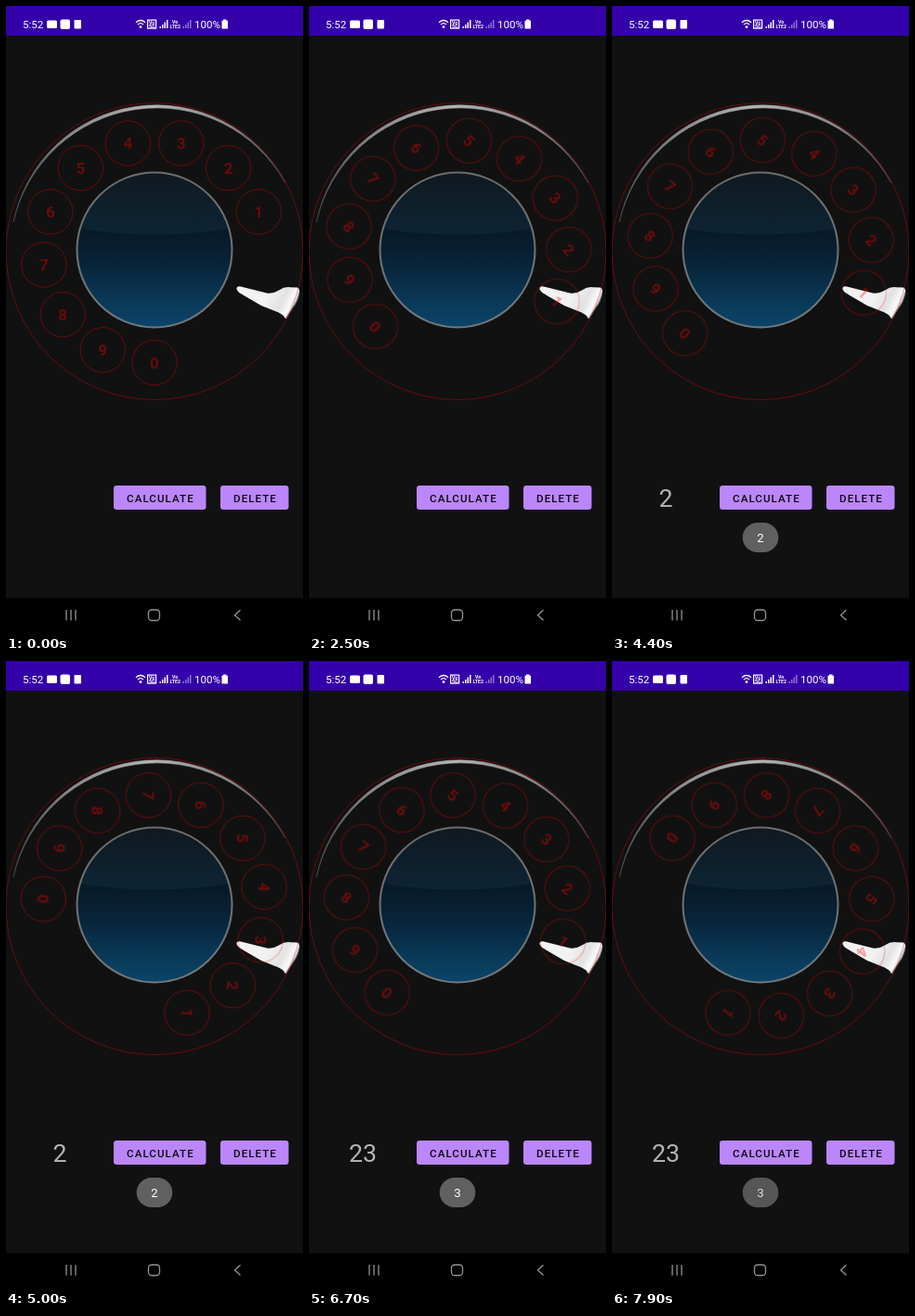
Animation, 320 px wide and 676 px high, one loop 8000 ms. Source, as an HTML page:

```html
<!DOCTYPE html>
<html lang="en">
<head>
<meta charset="utf-8">
<title>Rotary dial calculator</title>
<style>
  html, body { margin: 0; width: 100%; height: 100%; overflow: hidden; background: #111; }
  svg { display: block; width: 100%; height: 100%; font-family: Roboto, sans-serif; }

  .status { fill: #fff; font-size: 11.6px; }
  .status .tiny { font-size: 5.2px; font-weight: 700; }
  .button rect { fill: #bb86fc; }
  .button text { fill: #0a0a0a; font-size: 11.6px; font-weight: 500; letter-spacing: 1.04px; }
  .result { fill: #b4b4b4; font-size: 26.7px; }
  .toast rect { fill: #606060; }
  .toast text { fill: #fff; font-size: 13.2px; }
  .mid { text-anchor: middle; }
  .nav { fill: none; stroke: #949494; stroke-width: 1.3; }

  .ring, #dial circle { fill: none; stroke: rgba(255, 0, 0, .37); stroke-width: 1; }
  #dial text { fill: rgba(255, 0, 0, .36); font-size: 17px; font-weight: 700; }
  #dial { transform-origin: 160px 264.5px; }

  /* The screen refreshes every 100 ms, so all motion is stepped. */
  #dial, .result, .toast { animation: 8s -.01s steps(1) infinite; }
  #dial { animation-name: turn; }
  #first { animation-name: first; }
  #both { animation-name: both; }
  #toast2 { animation-name: toast2; }
  #toast3 { animation-name: toast3; }

  @keyframes turn {
    0% { transform: rotate(0deg); }
    23.75% { transform: rotate(0deg); animation-timing-function: steps(9); }
    35% { transform: rotate(71.3deg); }
    36.25% { transform: rotate(71.3deg); animation-timing-function: steps(6); }
    43.75% { transform: rotate(0deg); }
    48.75% { transform: rotate(0deg); animation-timing-function: steps(11); }
    62.5% { transform: rotate(93.8deg); }
    63.75% { transform: rotate(99deg); }
    65% { transform: rotate(99deg); animation-timing-function: steps(6); }
    72.5% { transform: rotate(0deg); }
    77.5% { transform: rotate(0deg); animation-timing-function: steps(5); }
    83.75% { transform: rotate(39.2deg); animation-timing-function: steps(12); }
    98.75%, 100% { transform: rotate(127.75deg); }
  }
  @keyframes first {
    0% { opacity: 0; }
    43.75% { opacity: 1; }
    72.5%, 100% { opacity: 0; }
  }
  @keyframes both {
    0% { opacity: 0; }
    72.5%, 100% { opacity: 1; }
  }
  @keyframes toast2 {
    0% { opacity: 0; }
    43.75% { opacity: .15; }
    45% { opacity: .55; }
    46.25% { opacity: .85; }
    47.5% { opacity: 1; }
    68.75% { opacity: .85; }
    70% { opacity: .45; }
    71.25%, 100% { opacity: 0; }
  }
  @keyframes toast3 {
    0% { opacity: 0; }
    72.5% { opacity: .15; }
    73.75% { opacity: .55; }
    75% { opacity: .85; }
    76.25% { opacity: 1; }
    98.75%, 100% { opacity: .88; }
  }
</style>
</head>
<body>
<svg viewBox="0 0 320 676" preserveAspectRatio="none">
  <defs>
    <linearGradient id="rim" gradientUnits="userSpaceOnUse" x1="8" y1="0" x2="302" y2="0">
      <stop offset="0" stop-color="#777" stop-opacity=".5"/>
      <stop offset=".2" stop-color="#888"/>
      <stop offset=".5" stop-color="#b4b4b4"/>
      <stop offset=".8" stop-color="#888"/>
      <stop offset="1" stop-color="#777" stop-opacity=".5"/>
    </linearGradient>
    <linearGradient id="glass" x1="0" y1="0" x2="0" y2="1">
      <stop offset="0" stop-color="#0c151c"/>
      <stop offset=".4" stop-color="#081a28"/>
      <stop offset=".6" stop-color="#08253a"/>
      <stop offset=".85" stop-color="#0a3a5a"/>
      <stop offset="1" stop-color="#0b4468"/>
    </linearGradient>
    <linearGradient id="gloss" x1="0" y1="0" x2="0" y2="1">
      <stop offset="0" stop-color="#10191f"/>
      <stop offset="1" stop-color="#0d2636"/>
    </linearGradient>
    <linearGradient id="edge" x1="0" y1="0" x2="0" y2="1">
      <stop offset="0" stop-color="#6c6c6c"/>
      <stop offset="1" stop-color="#71787d"/>
    </linearGradient>
    <linearGradient id="metal" gradientUnits="userSpaceOnUse" x1="284" y1="310" x2="316" y2="326">
      <stop offset="0" stop-color="#f2f2f2"/>
      <stop offset=".45" stop-color="#e2e2e2"/>
      <stop offset=".7" stop-color="#fafafa"/>
      <stop offset="1" stop-color="#999"/>
    </linearGradient>
  </defs>

  <rect width="320" height="676" fill="#111"/>

  <rect width="320" height="32" fill="#3400aa"/>
  <g class="status">
    <text x="18" y="24">5:52</text>
    <rect x="44" y="15.5" width="11" height="8.5" rx="1.5"/>
    <rect x="58.5" y="14.5" width="10.5" height="10.5" rx="2"/>
    <rect x="73.5" y="15" width="7.5" height="9.5" rx="1"/>
    <g fill="none" stroke="#fff" stroke-width="1.2">
      <path d="M140 17.8Q145 13.2 150 17.8M141.9 20.1Q145 17.2 148.1 20.1"/>
      <rect x="152.6" y="15.1" width="9" height="9"/>
    </g>
    <circle cx="145" cy="22.6" r="1.4"/>
    <text class="tiny" x="154" y="19.6">Vo</text>
    <text class="tiny" x="154" y="23.6">5G</text>
    <path id="bars" d="M165.5 24v-2h1.5v2zM168 24v-4h1.5v4zM170.5 24v-6.5h1.5v6.5zM173 24v-9h1.5v9z"/>
    <text class="tiny" x="179" y="19">Vo</text>
    <text class="tiny" x="176.5" y="24.2">LTE2</text>
    <use href="#bars" x="25" opacity=".45"/>
    <text x="203" y="24">100%</text>
    <path d="M234 14.5h3.5v1.2h1.5v8.8h-6.5v-8.8h1.5z"/>
  </g>

  <path d="M8 233A157 157 0 0 1 301 191A158.6 158.6 0 0 0 8 233Z" fill="url(#rim)" stroke="url(#rim)" stroke-width=".6"/>
  <circle cx="160" cy="263" r="83.5" fill="url(#glass)"/>
  <path d="M79.5 240A83.5 83.5 0 0 1 240.5 240Q160 253 79.5 240Z" fill="url(#gloss)" opacity=".9"/>
  <circle cx="160" cy="263" r="83.5" fill="none" stroke="url(#edge)" stroke-width="2"/>

  <path d="M248.5 304Q249 301.5 253 302.4L281 309.5Q288 310.5 294 306.5Q300 302.5 306 303.2L314 303.6Q316.8 304.6 316 309Q314.5 318 309 325L302 336.5Q300.5 338 299.5 334.5Q297 331.5 290 329L275 323L252 309.5Q248 306.5 248.5 304Z" fill="url(#metal)"/>
  <path d="M316 309Q314.5 318 309 325L301.5 337" fill="none" stroke="#777" stroke-width="1.2"/>

  <circle class="ring" cx="160" cy="264.5" r="160"/>
  <g id="dial" class="mid"></g>

  <g class="mid">
    <text id="first" class="result" x="58" y="540">2</text>
    <text id="both" class="result" x="58" y="540">23</text>
    <g class="button">
      <rect x="116" y="517" width="99.5" height="26" rx="3.2"/>
      <text x="166.4" y="534.6">CALCULATE</text>
      <rect x="231" y="517" width="73.5" height="26" rx="3.2"/>
      <text x="268.5" y="534.6">DELETE</text>
    </g>
    <g id="toast2" class="toast">
      <rect x="140.7" y="557" width="38.6" height="32" rx="16"/>
      <text x="160" y="578">2</text>
    </g>
    <g id="toast3" class="toast">
      <rect x="140.7" y="557" width="38.6" height="32" rx="16"/>
      <text x="160" y="578">3</text>
    </g>
  </g>

  <rect y="638.5" width="320" height="37.5" fill="#000"/>
  <g class="nav">
    <path d="M65 651v11.5M70 651v11.5M75 651v11.5M252.5 651.2L246.5 656.7L252.5 662.2"/>
    <rect x="153.5" y="651" width="12" height="11.5" rx="3.5"/>
  </g>
</svg>
<script>
  const dial = document.getElementById('dial');
  const add = (name, attrs) => {
    const node = document.createElementNS('http://www.w3.org/2000/svg', name);
    for (const key in attrs) node.setAttribute(key, attrs[key]);
    return dial.appendChild(node);
  };
  // Ten holes on a ring divided into thirteen places, 0 at the bottom.
  for (let digit = 0; digit < 10; digit++) {
    const angle = Math.PI / 2 + (10 - digit) % 10 * 2 * Math.PI / 13;
    const x = 160 + 120 * Math.cos(angle);
    const y = 264.5 + 120 * Math.sin(angle);
    add('circle', { cx: x, cy: y, r: 24.2 });
    add('text', { x, y: y + 6 }).textContent = digit;
  }
</script>
</body>
</html>
```
